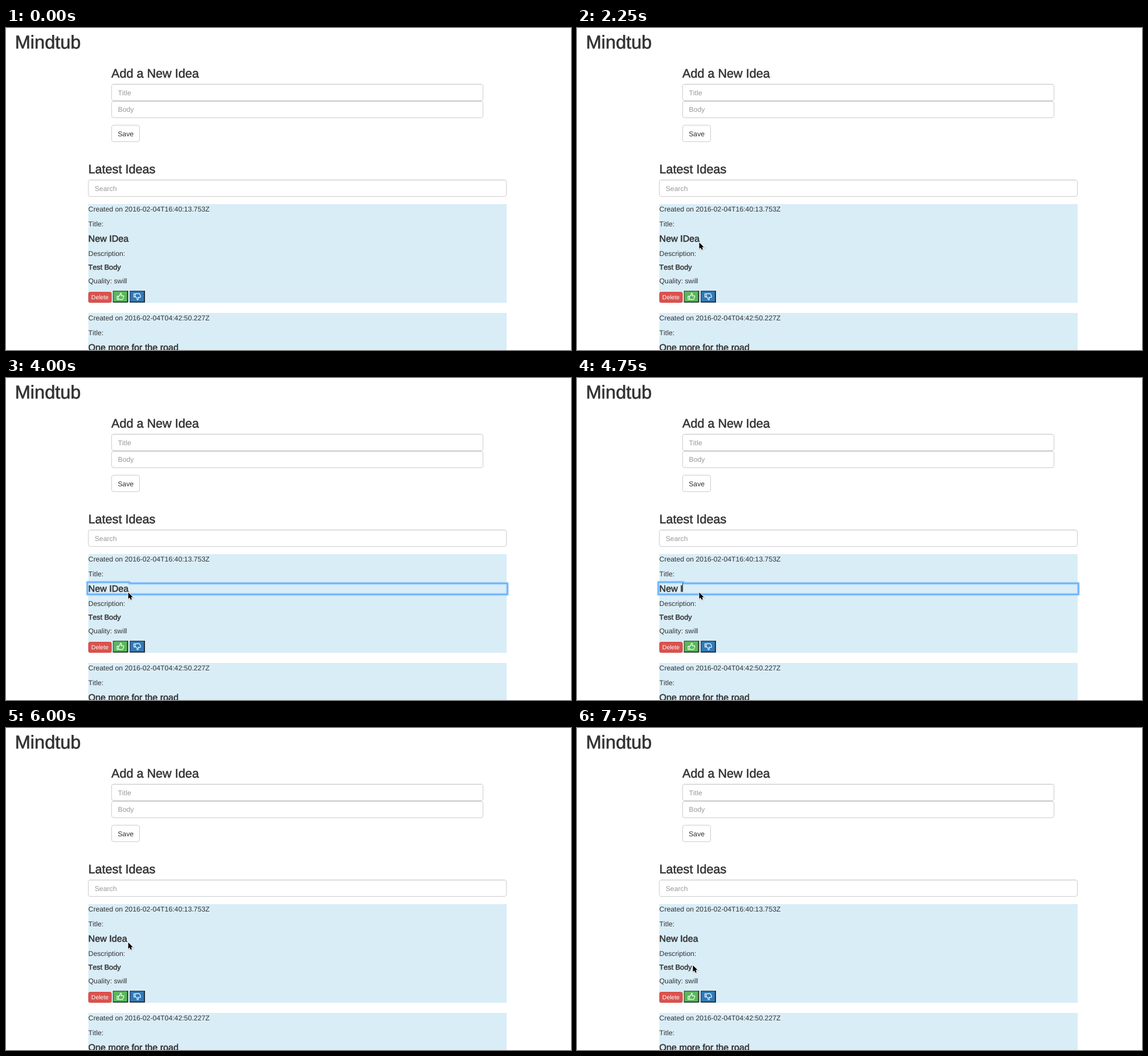
An HTML page for the animation above (8000 ms loop, 992 by 565 pixels).

```html
<!DOCTYPE html>
<html lang="en">
<head>
<meta charset="utf-8">
<title>Mindtub</title>
<style>
  html, body { margin: 0; width: 100%; height: 100%; overflow: hidden; background: #fff; }
  svg { display: block; }
  text {
    font-family: "Liberation Sans", Arial, sans-serif;
    font-size: 12.24px;
    font-kerning: none;
    text-rendering: geometricPrecision;
    fill: #333;
  }
  .h1, .h3, .h4, .h5 { stroke: #333; }
  .h1 { font-size: 32.5px; stroke-width: .7px; }
  .h3 { font-size: 21.6px; stroke-width: .55px; }
  .h4 { font-size: 16.1px; stroke-width: .55px; }
  .h5 { font-size: 12.65px; stroke-width: .45px; }
  .hint { fill: #999; }
  .small { font-size: 10.5px; fill: #fff; }
  .field { fill: #fff; stroke: #ccc; }
  .card { fill: #d9edf7; }
  .thumb { fill: none; stroke: #fff; stroke-width: 1.15; stroke-linejoin: round; }
  .ring path { fill: none; stroke: #6db3fb; stroke-linejoin: round; }
</style>
</head>
<body>
<svg width="992" height="565" viewBox="0 0 992 565">
  <defs>
    <path id="hand" class="thumb" d="M-6 -.6H-3.6V5H-6ZM-3.6 .1L-.4 -3.2V-5.6Q1.5 -6.4 1.8 -4.2L1.3 -1.4H4.8Q6.2 -1.1 5.7 .4L4.2 4.2Q3.9 5.1 2.8 5.1H-1.6L-3.6 4.1"/>
  </defs>

  <text class="h1" x="15.8" y="35.9">Mindtub</text>

  <text class="h3" x="185" y="86.5">Add a New Idea</text>
  <rect class="field" x="185.5" y="98.5" width="652" height="29" rx="3.5"/>
  <rect class="field" x="185.5" y="128.5" width="652" height="29" rx="3.5"/>
  <path d="M188 99.5H835M188 129.5H835" stroke="#eee"/>
  <text class="hint" x="196.6" y="117.7">Title</text>
  <text class="hint" x="196.6" y="147.2">Body</text>
  <rect class="field" x="185.5" y="170.5" width="49" height="29" rx="3.5"/>
  <text x="196.2" y="189.9">Save</text>

  <text class="h3" x="144.6" y="254.6">Latest Ideas</text>
  <rect class="field" x="144.5" y="266.5" width="734" height="29" rx="3.5"/>
  <path d="M147 267.5H876" stroke="#eee"/>
  <text class="hint" x="155.7" y="285.8">Search</text>

  <rect class="card" x="144.5" y="309" width="734.5" height="173.3"/>
  <g class="ring" id="ring">
    <path stroke-width="5" stroke-opacity=".35"/>
    <path stroke-width="2.6"/>
  </g>
  <text x="144.6" y="322.1">Created on 2016-02-04T16:40:13.753Z</text>
  <text x="144.6" y="348.1">Title:</text>
  <text class="h4" id="title" x="144.6" y="375.3"></text>
  <text x="144.6" y="399.8">Description:</text>
  <text class="h5" x="144.6" y="424.2">Test Body</text>
  <text x="144.6" y="447.8">Quality: swill</text>

  <rect x="145" y="463.5" width="40" height="18" rx="2.4" fill="#d9534f" stroke="#d43f3a"/>
  <text class="small" x="149.8" y="476.3">Delete</text>
  <g id="votes"></g>

  <rect class="card" x="144.5" y="500" width="734.5" height="65"/>
  <text x="144.6" y="512.9">Created on 2016-02-04T04:42:50.227Z</text>
  <text x="144.6" y="538.9">Title:</text>
  <text class="h4" x="144.6" y="566">One more for the road</text>

  <rect id="caret" y="360" width="1" height="15.5" fill="#222"/>
  <g id="cursor">
    <path d="M.6 1V12.4L3.2 10L4.8 13.9L7 13L5.4 9.2H9Z" fill="#000" stroke="#000" stroke-width="2" opacity=".13"/>
    <path d="M0 0V11.3L2.6 8.9L4.2 12.8L6.4 11.9L4.8 8.1H8.1Z" fill="#000" stroke="#fff" stroke-width="1.7" stroke-linejoin="round" paint-order="stroke"/>
  </g>
</svg>
<script>
const LOOP = 8000;
const FOCUS = [2500, 6000];
const LEFT = 144.6;
const $ = id => document.getElementById(id);

// [start, x, y] of the pointer tip
const moves = [
  [250, 445.5, 170], [500, 205.7, 353], [750, 189.7, 364], [1000, 221.8, 370.3],
  [2000, 214.6, 377], [2250, 214.6, 376.3], [6500, 40.7, 462.5], [6750, 186.2, 402.8],
  [7000, 205.6, 411.7], [7250, 206.4, 412.8], [7500, 207.3, 414], [7750, 203.5, 416.5]
];
const edits = [
  [0, "New IDea"], [4250, "New IDe"], [4500, "New ID"], [4750, "New I"],
  [5250, "New Ide"], [5500, "New Idea"]
];
const blinks = [[2500, 1], [3000, 0], [3500, 1], [4000, 0], [4250, 1], [6000, 0]];

const at = (steps, t) => steps.filter(s => s[0] <= t).pop();
const show = (el, on) => el.setAttribute("visibility", on ? "visible" : "hidden");

function voteButton(x, fill, turn) {
  return `<g transform="translate(${x} 461)">
    <rect width="26.5" height="20.5" fill="${fill}"/>
    <path d="M.6 20V.6H26" fill="none" stroke="#000" stroke-opacity=".5" stroke-width="1.3"/>
    <path d="M0 19.7H25.7V0" fill="none" stroke="#1c1c1c" stroke-width="1.6"/>
    <use href="#hand" transform="translate(13.2 10.2) ${turn}"/>
  </g>`;
}
$("votes").innerHTML =
  voteButton(187.8, "#5cb85c", "") + voteButton(217.4, "#337ab7", "scale(1 -1)");

function draw(t) {
  const move = at(moves, t);
  show($("cursor"), move);
  if (move) $("cursor").setAttribute("transform", `translate(${move[1]} ${move[2]})`);

  const title = $("title");
  const words = at(edits, t)[1];
  if (title.textContent !== words) title.textContent = words;
  const end = LEFT + title.getComputedTextLength();

  show($("ring"), t >= FOCUS[0] && t < FOCUS[1]);
  const outline = `M142.8 358.3H${end + 1.2}V360.3H880.4V379.7H142.8Z`;
  for (const path of $("ring").children) path.setAttribute("d", outline);

  const blink = at(blinks, t);
  show($("caret"), blink && blink[1]);
  $("caret").setAttribute("x", Math.floor(end - .6));
}

const began = performance.now();
function tick() {
  draw((performance.now() - began) % LOOP);
  requestAnimationFrame(tick);
}
tick();
</script>
</body>
</html>
```
